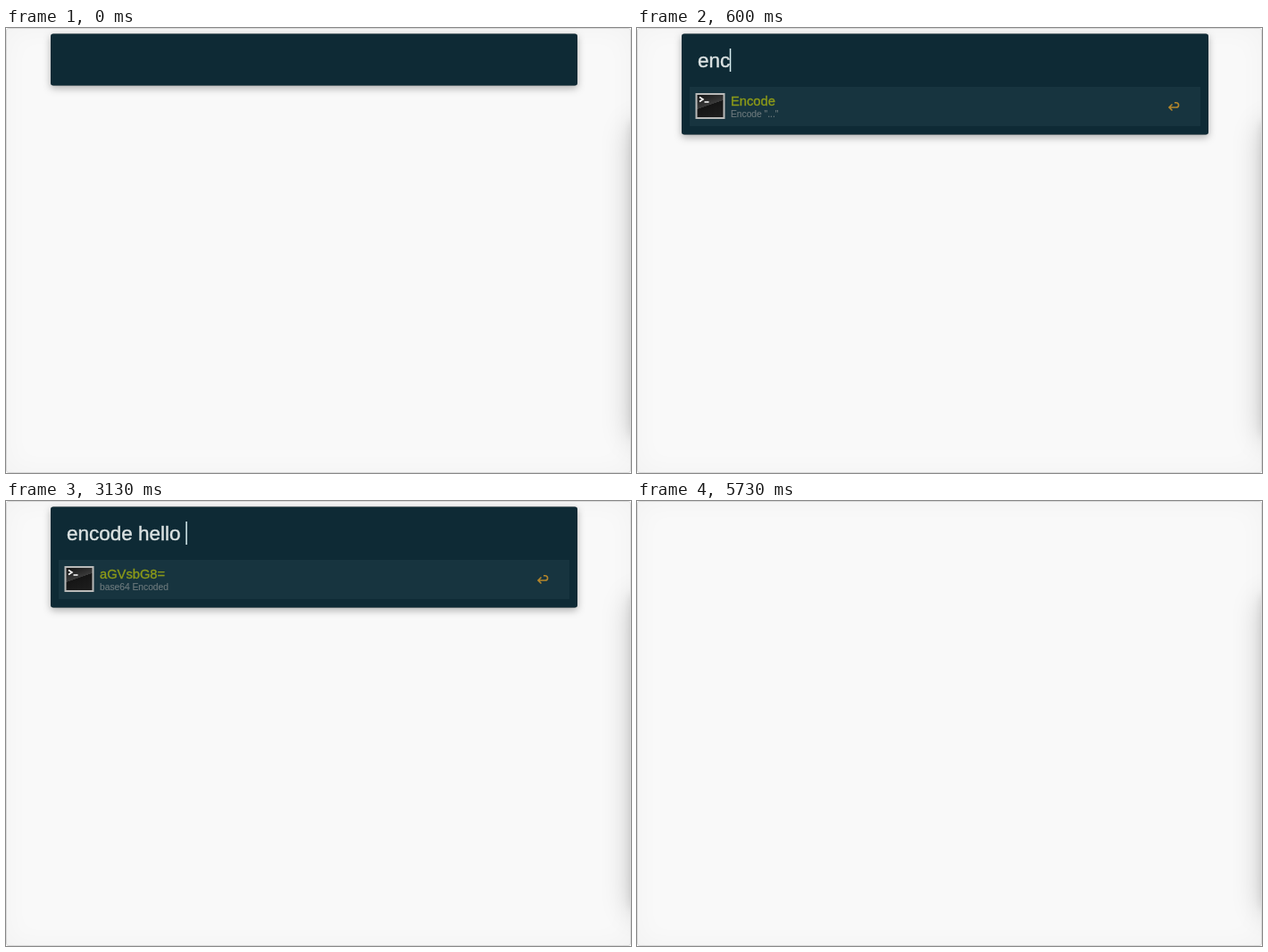
Recreate the animation shown at these times as an HTML page. Size 700x499 px, loop 6.99 s.

```html
<!DOCTYPE html>
<html lang="en">
<head>
<meta charset="utf-8">
<title>Encode launcher</title>
<style>
html, body { margin: 0; width: 100%; height: 100%; overflow: hidden; background: #fff; }
#stage { position: absolute; inset: 0; box-sizing: border-box; overflow: hidden; background: #f9f9f9;
  border: 1px solid #dadada; border-radius: 3px; box-shadow: inset 0 0 30px rgba(0,0,0,.03); }
#edge { position: absolute; left: 699px; top: 105px; width: 60px; height: 350px;
  box-shadow: 0 4px 34px rgba(0,0,0,.2), 0 0 10px rgba(0,0,0,.12); }
svg { position: absolute; left: 0; top: 0; width: 700px; height: 499px;
  font-family: "Liberation Sans", Arial, sans-serif; }
#panel { fill: #0e2a35; filter: drop-shadow(0 0 .5px rgba(0,0,0,.4)) drop-shadow(0 3px 4px rgba(0,0,0,.3)); }
#query { font-size: 22.5px; fill: #dbe2e2; stroke: #dbe2e2; stroke-width: .45; white-space: pre; }
.title { font-size: 14.7px; fill: #8b9799; stroke: #8b9799; stroke-width: .35; }
.first .title { fill: #8d9b18; stroke: #8d9b18; }
.sub { font-size: 10.25px; fill: #6c797c; stroke: #6c797c; stroke-width: .15; }
.key { font-size: 15px; fill: #c73c34; stroke: #c73c34; stroke-width: .5; }
.cmd { font-family: "DejaVu Sans", sans-serif; }
</style>
</head>
<body>
<div id="stage"><div id="edge"></div></div>
<svg viewBox="0 0 700 499">
  <defs>
    <clipPath id="disc"><circle cx="82" cy="87.500" r="15.500"/></clipPath>
    <linearGradient id="screen" x2=".4" y2="1">
      <stop offset="0" stop-color="#111"/><stop offset=".55" stop-color="#3a3a3a"/>
      <stop offset=".56" stop-color="#151515"/><stop offset="1" stop-color="#1c1c1c"/>
    </linearGradient>
    <linearGradient id="metal" x2="0" y2="1">
      <stop offset="0" stop-color="#d8dcdd"/><stop offset="1" stop-color="#a9aeb0"/>
    </linearGradient>
    <radialGradient id="glow">
      <stop offset="0" stop-color="#fff3c0"/><stop offset="1" stop-color="#f6ecd0"/>
    </radialGradient>
    <g id="terminal">
      <rect x="66.500" y="74" width="31" height="27" fill="url(#screen)" stroke="#b9bab9" stroke-width="2"/>
      <path d="M70 77.500l4 2.500l-4 2.500M75.500 83h5" fill="none" stroke="#fff" stroke-width="1.500"/>
    </g>
    <g id="bulb">
      <path d="M72.500 79a9.500 9.500 0 1 1 19 0c0 5-4 8-5 15h-9c-1-7-5-10-5-15z" fill="#efede8"/>
      <circle cx="82" cy="79" r="8" fill="url(#glow)"/>
      <path d="M78 94h8v7l-2 3h-4l-2-3z" fill="#a4a29c"/>
      <path d="M78 97h8M78 100h8" stroke="#716f69"/>
    </g>
    <path id="puzzle" fill="url(#metal)"
      d="M67.500 72h25q2 0 2 2v9c6-3 6 11 0 8v9q0 2-2 2h-8c3-7-11-7-8 0h-9q-2 0-2-2v-26q0-2 2-2z"/>
    <g id="flag" clip-path="url(#disc)" fill="none">
      <path d="M66 72h32v32h-32z" fill="#24458f"/>
      <path d="M66 71.500l32 32M98 71.500l-32 32" stroke="#fff" stroke-width="5"/>
      <path d="M66 71.500l32 32M98 71.500l-32 32" stroke="#d5342d" stroke-width="1.700"/>
      <path d="M82 71v33M66 87.500h32" stroke="#fff" stroke-width="7.500"/>
      <path d="M82 71v33M66 87.500h32" stroke="#d5342d" stroke-width="4"/>
    </g>
  </defs>
  <g id="launcher">
    <rect id="panel" x="50" y="6.500" width="590" rx="3"/>
    <text id="query" x="68" y="44"></text>
    <rect id="caret" y="23" width="1.500" height="26" fill="#d9eef0"/>
    <g id="list"></g>
  </g>
</svg>
<script>
const LOOP = 6990, PITCH = 45.2;
const $ = id => document.getElementById(id);

const use = id => `<use href="#${id}"/>`;
const box = (x, y, w, h, fill, r = 0) =>
  `<rect x="${x}" y="${y}" width="${w}" height="${h}" rx="${r}" fill="${fill}"/>`;

const panes = '/System/Library/PreferencePanes/';
const energy = [use('bulb'), 'Energy Saver', panes + 'EnergySaver.prefPane'];
const encode = [use('terminal'), 'Encode', 'Encode "..."'];
const english = [use('flag'), 'Translate from English', 'Type word to translate'];
const apps = [
  ['<circle cx="82" cy="87" r="17.500" fill="#315c91"/>', 'FirefoxDeveloperEdition', '/Applications/FirefoxDeveloperEdition.app'],
  [box(68, 71, 28, 33, '#e8e8e6'), 'PageLeaf', '/Applications/TextEdit.app'],
  energy,
  [box(64, 69, 36, 36, '#27479f', 4), 'Velmo Scan 2', '/Applications/Epson Software/Epson Scan 2.app'],
  [box(63, 69, 38, 37, '#79a9d3'), 'Handy Photo Scan', '/Applications/Epson Software/Easy Photo Scan.app'],
  [box(70, 74, 24, 26, '#f2f2f2'), 'LICEcap', '/Applications/LICEcap.app'],
  [use('puzzle'), 'Extensions', panes + 'Extensions.prefPane'],
  [box(66, 73, 32, 29, '#1b1b1b'), 'Desktop Gallery', panes + 'Expose.prefPane'],
  [box(67, 72, 29, 31, '#e3e4e4'), 'IDLE', '/usr/local/Cellar/python/2.7.13_1/IDLE.app']
];

const phrase = 'encode hello world';
// Time at which each character of the phrase is typed
const keys = [330, 470, 600, 730, 800, 870, 1000, 1600, 1800, 2070, 2270, 2530, 3000,
  3200, 3400, 3600, 3800, 4070];

function results(query) {
  if (!query) return [];
  if (query === 'e') return apps;
  if (query === 'en') return [energy, encode, english, english, english, english];
  const word = query.slice(7).trim();
  if (!word) return [encode];
  const url = word.replace(/ /g, '+');
  const rows = [[use('terminal'), btoa(word), 'base64 Encoded']];
  if (url !== word) rows.unshift([use('terminal'), url, 'URL Encoded']);
  return rows;
}

const enter = '<path d="M599.500 85.500l-3.500 3.500l3.500 3.500M596 89h8a2.600 2.600 0 0 0 0-5.200h-2" ' +
  'fill="none" stroke="#b5862b" stroke-width="1.600"/>';

function row([icon, title, sub], i) {
  const key = i
    ? `<text class="key cmd" x="594.500" y="93">⌘</text><text class="key" x="608.500" y="93">${i + 1}</text>`
    : enter;
  return `<g class="${i ? '' : 'first'}" transform="translate(0 ${i * PITCH})">
    ${i ? '' : box(59, 66, 572, 44, '#17343f')}${icon}
    <text class="title" x="105" y="87">${title}</text>
    <text class="sub" x="105" y="100">${sub}</text>${key}</g>`;
}

let shown;
function show(query) {
  if (query === shown) return;
  shown = query;
  const rows = results(query);
  $('panel').setAttribute('height', rows.length ? 113 + PITCH * (rows.length - 1) : 58);
  $('query').textContent = query;
  $('list').innerHTML = rows.map(row).join('');
  $('caret').setAttribute('x', 67.5 + (query ? $('query').getComputedTextLength() : 0));
}

const clamp = v => Math.max(0, Math.min(1, v));

// Solid after a key press, then fading out and in
function blink(age) {
  const a = age % 1100;
  return clamp(a < 800 ? (550 - a) / 250 : (a - 850) / 250);
}

function frame(now) {
  const t = now % LOOP;
  const count = keys.filter(k => k <= t).length;
  show(phrase.slice(0, count));
  $('caret').setAttribute('opacity', count ? blink(t - keys[count - 1]) : 0);
  $('launcher').setAttribute('opacity', clamp((5730 - t) / 130));
  requestAnimationFrame(frame);
}
requestAnimationFrame(frame);
</script>
</body>
</html>
```
